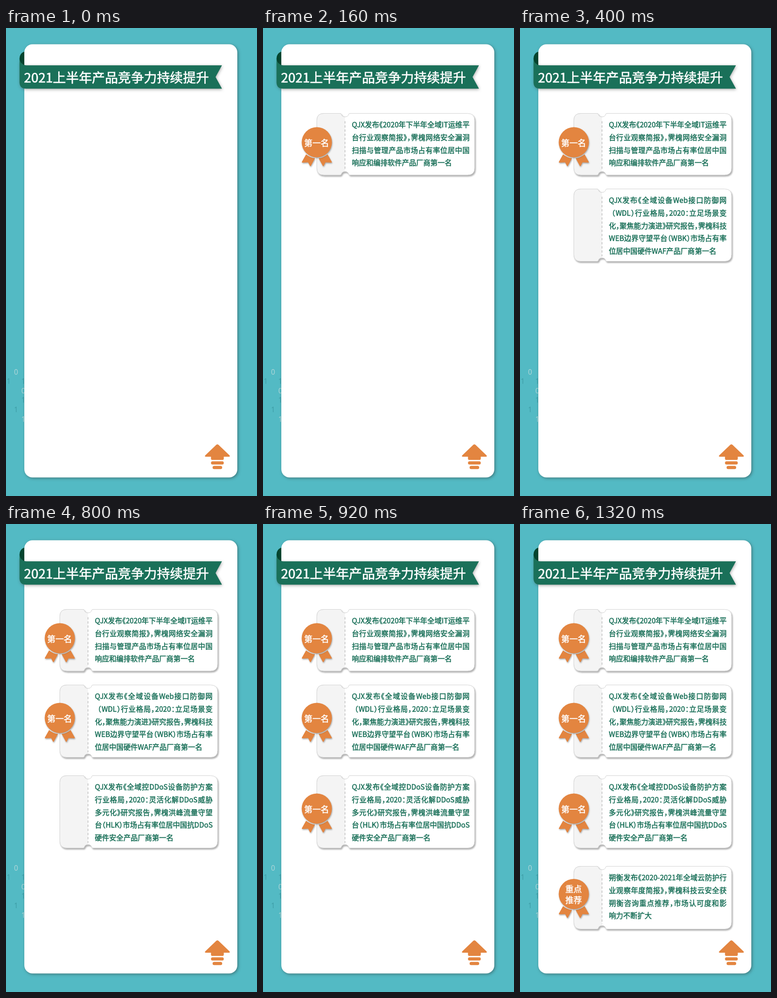
Write an HTML page that moves like this. It is 548 by 1022 pixels and loops after 5 s.

```html
<!DOCTYPE html>
<html lang="zh-CN">
<head>
<meta charset="utf-8">
<title>产品竞争力</title>
<style>
  html, body { margin: 0; width: 100%; height: 100%; overflow: hidden; background: #53bac4; }
  #stage {
    position: relative; width: 548px; height: 1022px; overflow: hidden; background: #53bac4;
    font-family: "Noto Sans CJK SC", "Noto Sans SC", "Noto Sans CJK", sans-serif;
  }
  svg { position: absolute; left: 0; top: 0; width: 548px; height: 1022px; overflow: hidden; }
  .panel { filter: drop-shadow(2px 2px 3px rgba(50, 70, 70, .55)); }
  .band { filter: drop-shadow(1px 2px 3px rgba(60, 60, 60, .42)); }
  .ticket { filter: drop-shadow(2px 3px 1.5px rgba(70, 70, 70, .42)); }
  .badge { filter: drop-shadow(1px 2px 1.5px rgba(70, 70, 70, .45)); }
  .white { fill: #fff; stroke: #fff; text-anchor: middle; }
  .copy {
    position: absolute; left: 194px; width: 257px;
    font-size: 15.6px; line-height: 27.75px; color: #1a7059;
    -webkit-text-stroke: .55px #1a7059;
    font-feature-settings: "halt"; text-spacing-trim: space-all; text-autospace: no-autospace;
  }
  .copy div { white-space: nowrap; text-align: justify; text-align-last: justify; }
  .copy div:last-child { text-align-last: left; }
</style>
</head>
<body>
<div id="stage">
  <svg viewBox="0 0 548 1022">
    <g id="bits" font-family="'Noto Sans', sans-serif" font-size="15.5" text-anchor="middle"></g>
    <rect class="panel" x="40" y="35.5" width="465" height="946" rx="18" fill="#fff"/>
    <path d="M40 51.5A15.5 15.5 0 0 0 29.500 66Q30 80 40 82Z" fill="#04452f"/>
    <path class="band" fill="#1a7059" d="M29.500 66A15.5 15.5 0 0 0 45 81.500H471.500L457.500 107L471.500 132.500H44Q29.500 132.500 29.500 118Z"/>
    <text class="white" x="241.2" y="118.8" font-size="28.4" stroke-width=".7">2021上半年产品竞争力持续提升</text>
    <g fill="#e38540" transform="translate(.5 .3)">
      <path d="M458.5 910Q461 908 463.5 910L487.5 933Q489.500 936 486 936H475V940Q475 943 472 943H450Q447 943 447 940V936H436Q432.500 936 434.500 933Z"/>
      <rect x="447" y="946" width="28" height="7" rx="3.5"/>
      <rect x="450.500" y="956" width="21" height="7" rx="3.5"/>
    </g>
  </svg>
</div>
<script>
const LOOP = 5000;
const stage = document.getElementById('stage');

// Faint binary digits: character, x, baseline, light or dark
const bits = [
  ['0', 22, 756.5, 1], ['1', 6, 777, 0], ['1', 38, 777, 0], ['0', 38, 797.5, 1],
  ['1', 38, 818, 0], ['1', 22, 838.5, 0], ['1', 38, 859.5, 1],
];
document.getElementById('bits').innerHTML = bits.map(([c, x, y, light]) =>
  `<text x="${x}" y="${y}" fill="${light ? '#aed6d8' : '#3f9ea7'}">${c}</text>`).join('');

const cards = [
  { at: 40, top: 186.5, bottom: 321, cy: 249.5, label: ['第一名'], lines: [
    'QJX发布《2020年下半年全域IT运维平',
    '台行业观察简报》，霁槐网络安全漏洞',
    '扫描与管理产品市场占有率位居中国',
    '响应和编排软件产品厂商第一名'] },
  { at: 400, top: 351.5, bottom: 509.5, cy: 423.5, label: ['第一名'], lines: [
    'QJX发布《全域设备Web接口防御网',
    '（WDL）行业格局，2020：立足场景变',
    '化，聚焦能力演进》研究报告，霁槐科技',
    'WEB边界守望平台（WBK）市场占有率',
    '位居中国硬件WAF产品厂商第一名'] },
  { at: 800, top: 549.5, bottom: 707.5, cy: 621.5, label: ['第一名'], lines: [
    'QJX发布《全域控DDoS设备防护方案',
    '行业格局，2020：灵活化解DDoS威胁',
    '多元化》研究报告，霁槐洪峰流量守望',
    '台（HLK）市场占有率位居中国抗DDoS',
    '硬件安全产品厂商第一名'] },
  { at: 1200, top: 747.5, bottom: 884.5, cy: 808, label: ['重点', '推荐'], lines: [
    '朔衡发布《2020-2021年全域云防护行',
    '业观察年度简报》，霁槐科技云安全获',
    '朔衡咨询重点推荐，市场认可度和影',
    '响力不断扩大'] },
];

function layer(html) {
  const el = document.createElement('div');
  el.innerHTML = html;
  stage.append(el);
  return el;
}

const svg = body => `<svg viewBox="0 0 548 1022">${body}</svg>`;

// Ticket outline with a notch at the top and bottom of the tear line
function ticket({ top: t, bottom: b }) {
  const left = `M179 ${t + 7.5}Q172.500 ${t + 7.5} 171 ${t + 2}Q170.500 ${t} 168 ${t}H133Q117.500 ${t} 117.500 ${t + 15}
    V${b - 15}Q117.500 ${b} 133 ${b}H168Q170.500 ${b} 171 ${b - 2}Q172.500 ${b - 7.5} 179 ${b - 7.5}`;
  const right = `Q185.500 ${b - 7.5} 187 ${b - 2}Q187.500 ${b} 190 ${b}H446.500Q462 ${b} 462 ${b - 15}
    V${t + 15}Q462 ${t} 446.500 ${t}H190Q187.500 ${t} 187 ${t + 2}Q185.500 ${t + 7.5} 179 ${t + 7.5}Z`;
  return svg(`<g class="ticket">
      <path d="${left}${right}" fill="#fff" stroke="#d2d2d2"/>
      <path d="${left}Z" fill="#f4f4f4"/>
      <path d="${left}" fill="none" stroke="#d2d2d2"/>
    </g>
    <path d="M179 ${t + 17}V${b - 11}" stroke="#bdbdbd" stroke-width="1.500" stroke-dasharray="5 4"/>`);
}

function copy({ top, lines }) {
  const rows = lines.map(s =>
    `<div${s[0] === '（' ? ' style="padding-left:6px"' : ''}>${s}</div>`).join('');
  return `<div class="copy" style="top:${top + 10.6}px">${rows}</div>`;
}

function badge({ cy, label }) {
  const tail = 'M-23.500 26.500Q-15 33.500 -4 35L-13 51.500Q-14 53 -15 51.500L-19 44L-31 44.500Q-33.500 44.500 -32.500 42.500Z';
  const base = cy + 8.5 - (label.length - 1) * 12.5;
  const text = label.map((s, i) =>
    `<text class="white" x="117" y="${base + i * 23.5}" font-size="18" stroke-width=".55">${s}</text>`).join('');
  return svg(`<g transform="translate(117.500 ${cy})" fill="#e38540">
      <g class="badge"><path d="${tail}"/><path d="${tail}" transform="scale(-1 1)"/></g>
      <circle class="badge" r="33"/>
    </g>${text}`);
}

// Hidden until its moment, then shown to the end of the loop
function showAt(el, ms) {
  el.animate([
    { visibility: 'hidden', offset: 0, easing: 'step-end' },
    { visibility: 'visible', offset: ms / LOOP },
    { visibility: 'visible', offset: 1 },
  ], { duration: LOOP, iterations: Infinity });
}

for (const card of cards) {
  showAt(layer(ticket(card) + copy(card)), card.at);
  showAt(layer(badge(card)), card.at + 120);
}
</script>
</body>
</html>
```
